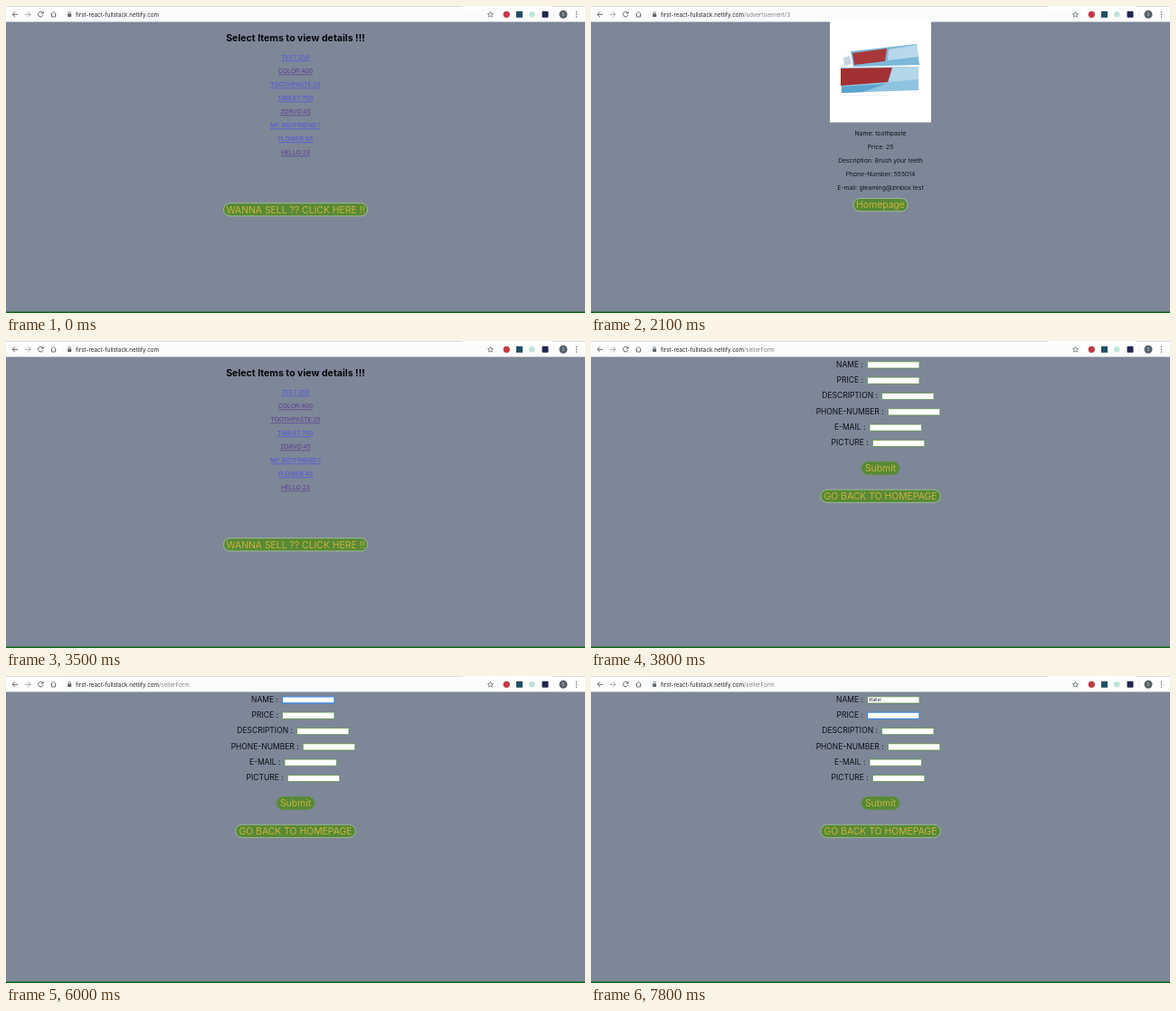
Write an HTML page that moves like this. It is 640x339 px and loops after 8000 ms.

```html
<!DOCTYPE html>
<html lang="en">
<head>
<meta charset="utf-8">
<title>Item shop</title>
<style>
  html, body { margin: 0; height: 100%; overflow: hidden; background: #7d8797; }
  svg { display: block; width: 640px; height: 339px; font-family: Inter, Roboto, sans-serif; }
</style>
</head>
<body>
<svg id="stage" viewBox="0 0 640 339"></svg>
<script>
const LOOP = 8000;
const stage = document.getElementById('stage');

// Text whose capitals are centred on y
const text = (s, x, y, size, fill = '#11151c', extra = 'text-anchor="middle"') =>
  `<text x="${x}" y="${y + size * 0.364}" font-size="${size}" fill="${fill}" ${extra}>${s}</text>`;
const rect = (x, y, w, h, fill, extra = '') =>
  `<rect x="${x}" y="${y}" width="${w}" height="${h}" fill="${fill}" ${extra}/>`;
const circle = (x, y, r, fill) => `<circle cx="${x}" cy="${y}" r="${r}" fill="${fill}"/>`;
const line = (d, color, width = 1) =>
  `<path d="${d}" fill="none" stroke="${color}" stroke-width="${width}"/>`;
const shape = (d, fill) => `<path d="${d}" fill="${fill}"/>`;

const button = (label, y, w, border = '#b4cda8') =>
  rect(320 - w / 2, y - 7.1, w, 14.2, '#568a36', `rx="7.1" stroke="${border}" stroke-width=".7"`) +
  text(label, 320, y, 10.4, '#cdb13c');

function toolbar(path) {
  const ink = '#5f6368';
  return rect(0, 0, 640, 17.5, '#fff') +
    rect(0, 0, 505, 1, '#d8dbe0') + rect(603, 0, 37, 1, '#d8dbe0') +
    rect(62, 3.5, 481, 11.5, '#fafbfb', 'rx="5.7"') +
    line('M13 9.3H7.3M10 6.4L7.1 9.3L10 12.2', ink) +
    line('M21 9.3H27M24.2 6.4L27.1 9.3L24.2 12.2', '#a2a5a9') +
    line('M40.6 7.5A2.8 2.8 0 1 0 41 10M41.2 5.9V8.2H38.9', ink) +
    line('M49.3 9.3L52.5 6.3L55.7 9.3M50.5 8.8V12H54.5V8.8', ink, 0.9) +
    rect(68.2, 8.6, 4, 3.4, ink, 'rx=".4"') +
    line('M69 8.8V7.6A1.2 1.2 0 0 1 71.4 7.6V8.8', ink, 0.7) +
    text(`first-react-fullstack.netlify.com<tspan fill="#80868b">${path}</tspan>`, 77, 9.4, 6.3, '#25282c', '') +
    line('M535.5 6.4L536.4 8.4L538.5 8.6L536.9 10L537.4 12.1L535.5 11L533.6 12.1L534.1 10L532.5 8.6L534.6 8.4Z', ink, 0.7) +
    circle(553.3, 9.3, 3.6, '#c23a45') +
    rect(564, 5.8, 7, 7, '#214f66') +
    circle(581.3, 9.3, 3.3, '#bfe5d8') +
    rect(592.5, 5.8, 7, 7, '#222650', 'rx="1"') +
    line('M605.8 5V13.6', '#dadce0', 0.6) +
    circle(616, 9.3, 4.5, '#57616b') +
    text('S', 616, 9.3, 4.5, '#d5dade') +
    [6.7, 9.3, 11.9].map(y => circle(630.5, y, 0.75, ink)).join('');
}

const items = ['TEST:250', 'COLOR:400', 'TOOTHPASTE:25', 'TABLET:700', 'ZORVO:45',
  'MY BOYFRIEND:1', 'FLOWER:45', 'HELLO:23'];

function home(visited) {
  const links = items.map((item, i) => text(item, 320, 57 + i * 15, 6.8,
    visited.includes(i) ? '#5a3a93' : '#4c54e3',
    'text-anchor="middle" text-decoration="underline"'));
  return text('Select Items to view details !!!', 320, 35.3, 10.57, '#050608',
    'text-anchor="middle" font-weight="700"') +
    links.join('') + button('WANNA SELL ?? CLICK HERE !!', 224.8, 159);
}

const photo = rect(264, 17, 112, 111.5, '#fff') +
  // tube
  shape('M279 57L286 55L288 64L280 66Z', '#c9d5de') +
  shape('M287 50L360 42L363 65L290 67Z', '#7db7da') +
  shape('M289 52L327 47L325 61L291 65Z', '#a9383a') +
  shape('M329 48L360 43L362 56L328 60Z', '#b9d9ea') +
  // box
  shape('M276 68L362 67V93L277 96Z', '#8fc3e0') +
  shape('M276 69L333 68L328 84L276 88Z', '#a33032') +
  shape('M333 68L362 67V81L329 84Z', '#b4d6e9') +
  shape('M277 89L326 86L300 95L277 96Z', '#5ba4d0') +
  rect(277, 98, 52, 1.2, '#eef1f4');

const details = ['Name: toothpaste', 'Price: 25', 'Description: Brush your teeth',
  'Phone-Number: 555014', 'E-mail: gleaming@zinbox.test'];

const product = () => photo +
  details.map((s, i) => text(s, 320, 141 + i * 15, 6.8)).join('') +
  button('Homepage', 219.6, 60);

const fields = [['NAME', 305.5], ['PRICE', 305.5], ['DESCRIPTION', 321.5],
  ['PHONE-NUMBER', 328.3], ['E-MAIL', 308], ['PICTURE', 311.3]];

function form(name, focus, hint) {
  const rows = fields.map(([label, x], i) => {
    const y = 25.7 + i * 17.32, on = i === focus;
    return text(label + ' :', x - 4.6, y, 8.5, '#0c0f14', 'text-anchor="end"') +
      rect(x, y - 2.9, 57.5, 7.2, '#fff',
        `rx=".6" stroke="${on ? '#3f86dc' : '#5b8f45'}" stroke-width="${on ? 1.3 : 0.8}"`);
  });
  const list = hint
    ? rect(305, 30.8, 86, 23.4, '#fff', 'rx="2" stroke="#687281" stroke-opacity=".5" stroke-width=".6"') +
      text('wallet', 310.5, 42.6, 6, '#202124', '')
    : '';
  return rows.join('') + text(name, 307, 26.4, 4.8, '#20242a', '') + list +
    button('Submit', 140.4, 42, '#5f9340') + button('GO BACK TO HOMEPAGE', 171.3, 132.5);
}

function scene(t) {
  if (t < 900) return ['', home([1, 4, 7])];
  if (t < 2300) return ['/advertisement/3', product()];
  if (t < 3700) return ['', home([1, 2, 4, 7])];
  const letters = Math.max(0, Math.min(6, Math.floor((t - 6150) / 150)));
  const focus = t < 5900 ? -1 : t < 7500 ? 0 : 1;
  return ['/sellerForm', form('Wallet'.slice(0, letters), focus, letters > 0 && t < 7200)];
}

let shown = '';
function draw(now) {
  const [path, page] = scene(now % LOOP);
  const picture = rect(0, 0, 640, 339, '#7d8797') + toolbar(path) + page +
    rect(0, 337.5, 640, 1.5, '#0b6414');
  if (picture !== shown) stage.innerHTML = shown = picture;
  requestAnimationFrame(draw);
}
draw(performance.now());
</script>
</body>
</html>
```
